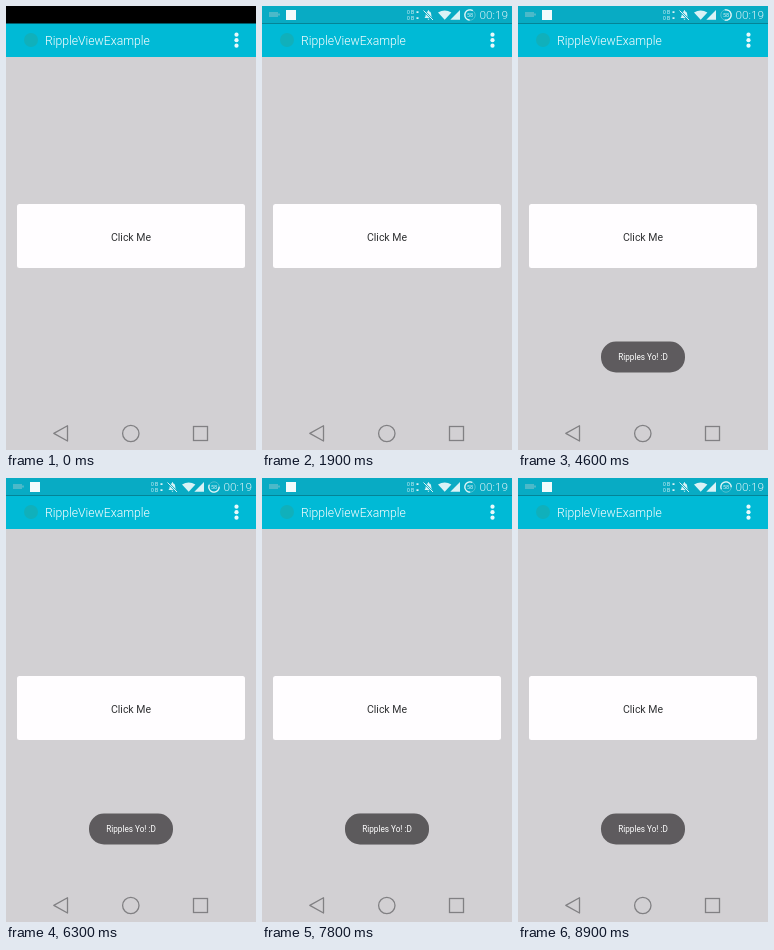
An HTML page that plays this animation: 250 by 444 pixels, repeating every 9000 ms.

```html
<!DOCTYPE html>
<html lang="en">
<head>
<meta charset="utf-8">
<title>Ripple button</title>
<style>
  html, body { margin: 0; width: 100%; height: 100%; overflow: hidden; background: #d2d0d3; }
  svg { display: block; width: 100%; height: 100%; font-family: Roboto, sans-serif; }
  .line { fill: none; stroke: #818083; stroke-width: 1.3; }
  .mid { text-anchor: middle; }
  .light { font-weight: 300; }
</style>
</head>
<body>
<svg viewBox="0 0 250 444">
  <defs>
    <clipPath id="card"><rect x="11" y="198" width="228" height="64" rx="2.5"/></clipPath>
    <g id="toast">
      <rect x="83" y="335.5" width="84" height="31" rx="15" fill="#4b494b" fill-opacity=".86"/>
      <text class="mid" x="125" y="354" font-size="8.2" fill="#fff">Ripples Yo! :D</text>
    </g>
  </defs>

  <rect width="250" height="444" fill="#d2d0d3"/>
  <rect y="17" width="250" height="34" fill="#00bad6"/>
  <circle cx="25" cy="34" r="7" fill="#10b0bb"/>
  <text class="light" x="39" y="39" font-size="12.2" fill="#fff">RippleViewExample</text>
  <g fill="#e9f9fb">
    <circle cx="230.5" cy="28.7" r="2.1"/>
    <circle cx="230.5" cy="34.2" r="2.1"/>
    <circle cx="230.5" cy="39.7" r="2.1"/>
  </g>

  <rect width="250" height="17.5" fill="#000"/>
  <g id="status" fill="#d9f2f6">
    <rect width="250" height="17.5" fill="#08abc4"/>
    <path d="M7 6h9v1.5h2v2h-2V11H7z" fill="#4bb9c9"/>
    <rect x="24" y="4" width="10" height="10" fill="#f2fbfc"/>
    <g font-size="5">
      <text x="145" y="8">0 B</text>
      <text x="145" y="14">0 B</text>
    </g>
    <path d="M154.5 5.2h2v1.8h-2zM154.5 11.2h2v1.8h-2z"/>
    <path d="M162.5 12c1.3-1 1-3 1.4-4.5.4-1.500 1.300-2 2.100-2.200V4.300h1v1c1.800.4 2.200 2 2.300 3.700s.4 2.200 1.200 3zM165.400 12.700h2.200l-1.100 1.200z"/>
    <path d="M161.500 4.500l9.500 9.500" stroke="#08abc4" stroke-width="2"/>
    <path d="M161.500 4.500l9.500 9.500" stroke="#d9f2f6"/>
    <path d="M176 6.500q6.700-4 13.400 0l-6.700 7.200zM198 4v9.700h-9.700z"/>
    <circle cx="208" cy="9" r="5.200" fill="none" stroke="#4fc0d0"/>
    <circle id="ring" cx="208" cy="9" r="5.200" fill="none" stroke="#e2f6f8" stroke-width="1.300" pathLength="100" stroke-dasharray="58 42"/>
    <text class="mid" x="208" y="11" font-size="5.500">58</text>
    <text class="light" x="217.500" y="13.300" font-size="11.800">00:19</text>
  </g>

  <rect x="11" y="198" width="228" height="64" rx="2.500" fill="#fffdff"/>
  <circle id="ripple" clip-path="url(#card)" fill="#cffbe6"/>
  <text class="mid" x="125" y="235" font-size="10.500" fill="#303133">Click Me</text>

  <use class="toast" href="#toast"/>
  <use class="toast" href="#toast"/>

  <path class="line" d="M61.500 419.800v15.200l-13.700-7.600z" stroke-linejoin="round"/>
  <circle class="line" cx="124.800" cy="427.500" r="8.200"/>
  <rect class="line" x="187.500" y="420.500" width="14" height="14"/>
</svg>
<script>
const LOOP = 9000, STEP = 100, MAX_R = 228, FADE = 500;

const ripples = [
  { at: 3343, ms: 767, x: 194, y: 222 },
  { at: 6903, ms: 767, x: 60, y: 238 },
  { at: 8220, ms: 670, x: 189, y: 214 }
];
const toasts = [
  { show: 3678, hide: 7370 },
  { show: 7380, hide: LOOP }
];

const status = document.getElementById('status');
const ring = document.getElementById('ring');
const ripple = document.getElementById('ripple');
const toastEls = document.querySelectorAll('.toast');

const clamp = v => Math.min(1, Math.max(0, v));
const set = (el, attrs) => {
  for (const key in attrs) el.setAttribute(key, attrs[key]);
};

// Decelerating entrance, accelerating exit
function toastAlpha(t, { show, hide }) {
  const enter = clamp((t - show) / FADE);
  const exit = clamp((t - hide) / FADE);
  return (1 - (1 - enter) ** 2) * (1 - exit ** 2);
}

function draw(t) {
  set(status, { opacity: clamp((t - 400) / 300) });
  set(ring, { transform: `rotate(${256 + (t - 4600) * 0.06} 208 9)` });

  const now = ripples.find(r => t >= r.at && t < r.at + r.ms);
  set(ripple, now
    ? { cx: now.x, cy: now.y, r: MAX_R * (t - now.at) / now.ms }
    : { r: 0 });

  toasts.forEach((toast, i) => set(toastEls[i], { opacity: toastAlpha(t, toast) }));
}

const start = performance.now();
function tick() {
  const t = (performance.now() - start) % LOOP;
  draw(Math.floor(t / STEP) * STEP);
  requestAnimationFrame(tick);
}
draw(0);
requestAnimationFrame(tick);
</script>
</body>
</html>
```
